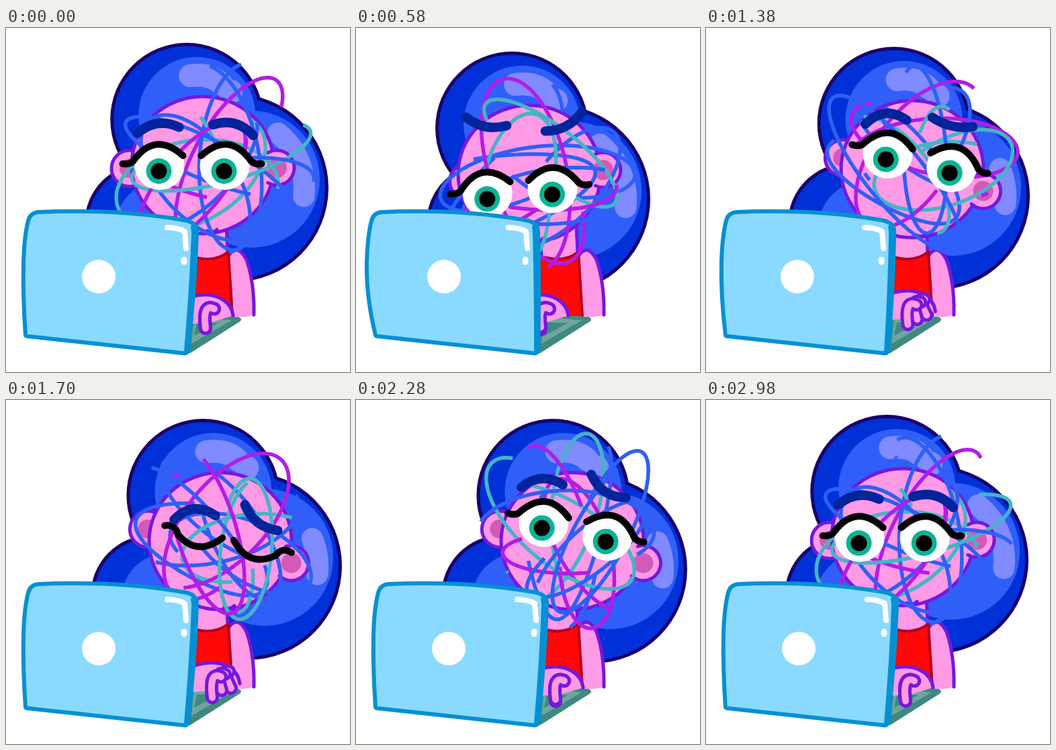
Animation, 512 px wide and 512 px high, one loop 3 s. Source, as an HTML page with a canvas:

```html
<!DOCTYPE html>
<html lang="en">
<head>
<meta charset="utf-8">
<title>Tangled thoughts</title>
<style>
html, body { margin: 0; width: 100%; height: 100%; overflow: hidden; background: #fff; }
canvas { display: block; width: 100vw; height: 100vh; }
</style>
</head>
<body>
<canvas id="stage" width="512" height="512"></canvas>
<script>
const g = document.getElementById('stage').getContext('2d');
const LOOP = 3000;
const C = {
  blue: '#0030d8', mid: '#2f5ff8', shine: '#7f8bff', edge: '#1c0068', brow: '#00249c',
  skin: '#ff9ae6', line: '#7518dc', ear: '#d35ab8', red: '#ff0808', wine: '#b00020',
  lid: '#8adaff', rim: '#0590d3', key: '#3f8980', keyTop: '#6ca69d', iris: '#08b495'
};
const inks = ['#2f5ff5', '#45b4c6', '#2f5ff5', '#b31ce6'];

// Head place, gaze offset, tilt in degrees, hair sway, lean to the screen, finger spread, brows
const poses = [
  { at: 0, x: 293, y: 204, gazeX: -16, gazeY: 0, tilt: 0, sway: 4, lean: 0, spread: 0, raise: 52, slant: 15, bendL: -20, bendR: -20 },
  { at: 580, x: 258, y: 217, gazeX: -14, gazeY: 25, tilt: -4, sway: -3, lean: 1, spread: 0, raise: 103, slant: -28, bendL: 16, bendR: 16 },
  { at: 960, x: 257, y: 219, gazeX: -18, gazeY: 17, tilt: -4, sway: 25, lean: 1, spread: .3, raise: 48, slant: -28, bendL: -28, bendR: 18 },
  { at: 1380, x: 307, y: 210, gazeX: 11, gazeY: -13, tilt: 12, sway: -8, lean: .3, spread: 1, raise: 57, slant: 13, bendL: -26, bendR: 12 },
  { at: 1700, x: 319, y: 210, gazeX: 12, gazeY: -5, tilt: 12, sway: -2, lean: 0, spread: 1, raise: 30, slant: 38, bendL: -26, bendR: 18 },
  { at: 2280, x: 322, y: 210, gazeX: 5, gazeY: -18, tilt: 12, sway: -12, lean: 0, spread: 0, raise: 64, slant: 34, bendL: -22, bendR: 20 }
];
poses.push({ ...poses[0], at: LOOP });

const mix = (a, b, k) => a + (b - a) * k;
const clamp = x => Math.max(0, Math.min(1, x));
const ramp = (t, a, b) => { const x = clamp((t - a) / (b - a)); return x * x * (3 - 2 * x); };
const rad = deg => deg * Math.PI / 180;

function poseAt(t) {
  const i = poses.findIndex(p => p.at > t);
  const a = poses[i - 1], b = poses[i], k = ramp(t, a.at, b.at);
  return Object.fromEntries(Object.keys(a).map(key => [key, mix(a[key], b[key], k)]));
}

function randomFrom(seed) {
  let s = seed * 7919 + 17;
  return (lo, hi) => {
    s = (s * 16807) % 2147483647;
    return mix(lo, hi, s / 2147483647);
  };
}

function paint(path, fill, stroke, width = 5) {
  if (fill) { g.fillStyle = fill; g.fill(path); }
  if (stroke) { g.strokeStyle = stroke; g.lineWidth = width; g.stroke(path); }
}
const shape = (d, fill, stroke, width) => paint(new Path2D(d), fill, stroke, width);
function oval(x, y, rx, ry, fill, stroke) {
  const p = new Path2D();
  p.ellipse(x, y, rx, ry, 0, 0, 7);
  paint(p, fill, stroke);
}
const disc = (x, y, r, fill, stroke) => oval(x, y, r, r, fill, stroke);
function arc(x, y, r, from, to, stroke, width) {
  const p = new Path2D();
  p.arc(x, y, r, from, to);
  paint(p, null, stroke, width);
}
function placed(x, y, deg, drawPart) {
  g.save();
  g.translate(x, y);
  g.rotate(rad(deg));
  drawPart();
  g.restore();
}

function hair({ x, y, sway, tilt }) {
  const back = { x: 207 + (x - 293) * .35, y: 291, r: 90, mx: 24, my: 5, mr: 68 };
  const side = { x: x + 43 + sway, y: y + 36 - sway * .5, r: 140, mx: 25, my: -13, mr: 102 };
  const bun = { x: x - 25 + sway * .3, y: y - 68, r: 114, mx: 15, my: -6, mr: 87 };
  const balls = [back, side, bun];
  for (const b of balls) disc(b.x, b.y, b.r, C.edge);
  for (const b of balls) disc(b.x, b.y, b.r - 5, C.blue);
  for (const b of balls) disc(b.x + b.mx, b.y + b.my, b.mr, C.mid);
  arc(side.x, side.y, 104, mix(-.9, -.4, clamp(tilt / 12)), .12, C.shine, 32);
  placed(bun.x + 5, bun.y - 65, 0, () => {
    shape('M0 0Q30 -4 46 12', null, C.shine, 34);
    disc(60, 24, 18, C.shine);
  });
}

function body() {
  shape('M278 290H328L331 345H278Z', C.skin);
  shape('M328 295L330 335', null, C.line);
  shape('M332 338Q345 320 358 345Q370 380 369 427Q352 433 336 428Z', C.skin);
  shape('M332 338Q345 320 358 345Q370 380 369 427', null, C.line);
  shape('M270 338Q308 352 331 333L338 430H270Z', C.red);
  shape('M270 338Q308 352 331 333L337 429', null, C.wine, 4);
}

function head({ x, y, tilt, lean }) {
  placed(x, y, tilt, () => {
    disc(-109 + 17 * lean, 5, 27, C.skin, C.line);
    disc(-110 + 17 * lean, 5, 14, C.ear);
  });
  oval(x, y, 106, 102, C.skin, C.line);
  placed(x, y, tilt, () => {
    const ex = 110, ey = 4 + tilt / 2;
    disc(ex, ey, 26, C.skin);
    arc(ex, ey, 26, -2.1, 2.1, C.line);
    disc(ex, ey, 15, C.ear);
  });
  shape(`M${x + 6} ${y + 98}q8 5 15 -2`, null, C.line);
}

// Each strand is a slowly turning ellipse that is drawn, held and unwound, then picks a new shape
function scribbles(t, { x, y }) {
  const strands = 12, rounds = 3, span = LOOP / rounds;
  g.lineCap = 'butt';
  for (let i = 0; i < strands; i++) {
    const clock = t / span + i * 5 / strands;
    const u = clock % 1, round = Math.floor(clock) % rounds;
    const from = ramp(u, .55, 1), to = ramp(u, 0, .5);
    const rnd = randomFrom(i * rounds + round + 1);
    const cx = x + rnd(-30, 50), cy = y + rnd(-35, 35);
    const rx = rnd(105, 150), ry = rnd(28, 60);
    const turn = i * 2.4 + round, twist = rnd(-.9, .9), begin = rnd(0, 6.28);
    const path = new Path2D();
    for (let n = 0; n <= 90; n++) {
      const s = mix(from, to, n / 90);
      const a = begin + s * 7, tilt = turn + twist * s;
      const px = rx * Math.cos(a), py = ry * Math.sin(a);
      path.lineTo(cx + px * Math.cos(tilt) - py * Math.sin(tilt), cy + px * Math.sin(tilt) + py * Math.cos(tilt));
    }
    paint(path, null, inks[i % inks.length], 5.5);
  }
  g.lineCap = 'round';
}

const openLash = [-55,-2, -42,0, -37,-9, -5,-50, 35,-14];
const shutLash = [-48,2, -33,-4, -26,11, 9,38, 40,2];

function eye(flip, shut) {
  g.save();
  g.translate(flip * -48.5, 0);
  if (shut < .95) {
    g.save();
    g.scale(1, 1 - shut);
    oval(0, 1, 37, 36, '#fff');
    disc(-1, 9, 19, C.iris);
    disc(-1, 9, 12, '#000');
    g.restore();
  }
  g.scale(flip, 1);
  const v = openLash.map((a, i) => mix(a, shutLash[i], shut));
  shape(`M${v.slice(0, 2)}Q${v.slice(2, 6)}Q${v.slice(6)}`, null, '#000', 10);
  g.restore();
}

function expression(t, { x, y, gazeX, gazeY, tilt, raise, slant, bendL, bendR }) {
  const shut = ramp(t, 1560, 1660) - ramp(t, 1780, 1900);
  const brow = (bx, deg, bend) => placed(bx, 0, deg, () =>
    shape(`M-31 0Q0 ${bend} 31 0`, null, C.brow, 14));
  placed(x + gazeX, y + gazeY, tilt, () => {
    eye(1, shut);
    eye(-1, shut);
  });
  placed(x + gazeX, y + gazeY - raise, 0, () => {
    brow(-50, tilt / 2 + 4 + bendL * .6, bendL);
    brow(61 - tilt, slant, bendR);
  });
}

function keyboard() {
  shape('M262 484L272 424L346 430Q353 433 348 437L274 484Z', C.key);
  shape('M276 470L280 430L336 435Z', C.keyTop);
  shape('M280 458L284 438L316 439Z', C.key);
}

function hand(t, { lean, spread }) {
  const tap = Math.sin(t / LOOP * Math.PI * 24) * 2;
  const palm = 'M252 408Q298 388 322 404Q336 412 338 428';
  g.save();
  g.translate(10 * spread - 22 * lean, -6 * spread);
  shape(palm + 'L306 438L252 442Z', C.skin);
  shape(palm, null, C.line);
  for (let i = 2; i >= 0; i--) {
    const k = i * spread, lift = i % 2 ? tap : -tap;
    const finger = `M${310 + k * 6} ${418 - k * 4}Q${292 + k * 9} ${409 - k * 2} ${297 + k * 14} ${447 - k * 7 + lift}`;
    shape(finger, null, C.line, 20);
    shape(finger, null, C.skin, 10);
  }
  g.restore();
}

function laptop({ lean }) {
  const l = -10 * lean, r = -13 * lean;
  shape(`M29 457Q${25 + l} 400 ${26 + l} 350Q${27 + l} 310 ${33 + l} 287Q${36 + l} 275 ${48 + l} 274
    Q${165 + l} 269 ${265 + r} 286Q${285 + r} 289 ${284 + r} 305Q${281 + r * .6} 390 271 480Q270 485 264 484L34 459Q29 459 29 457Z`,
    C.lid, C.rim, 6);
  shape(`M${279 + r} 297Q${280 + r} 300 ${280 + r} 306Q${277 + r * .6} 390 269 481`, null, C.rim, 8);
  shape(`M${240 + r} 297Q${256 + r} 297 ${266 + r} 303Q${267 + r} 315 ${268 + r} 328`, null, '#fff', 8);
  shape(`M${265 + r} 345v3`, null, '#fff', 9);
  disc(138 - 7 * lean, 370, 25, '#fff');
}

function draw(now) {
  const t = Math.max(0, now - start) % LOOP;
  const p = poseAt(t);
  g.clearRect(0, 0, 512, 512);
  g.lineCap = g.lineJoin = 'round';
  hair(p);
  body();
  head(p);
  scribbles(t, p);
  expression(t, p);
  keyboard();
  hand(t, p);
  laptop(p);
  requestAnimationFrame(draw);
}
const start = performance.now();
draw(start);
</script>
</body>
</html>
```
